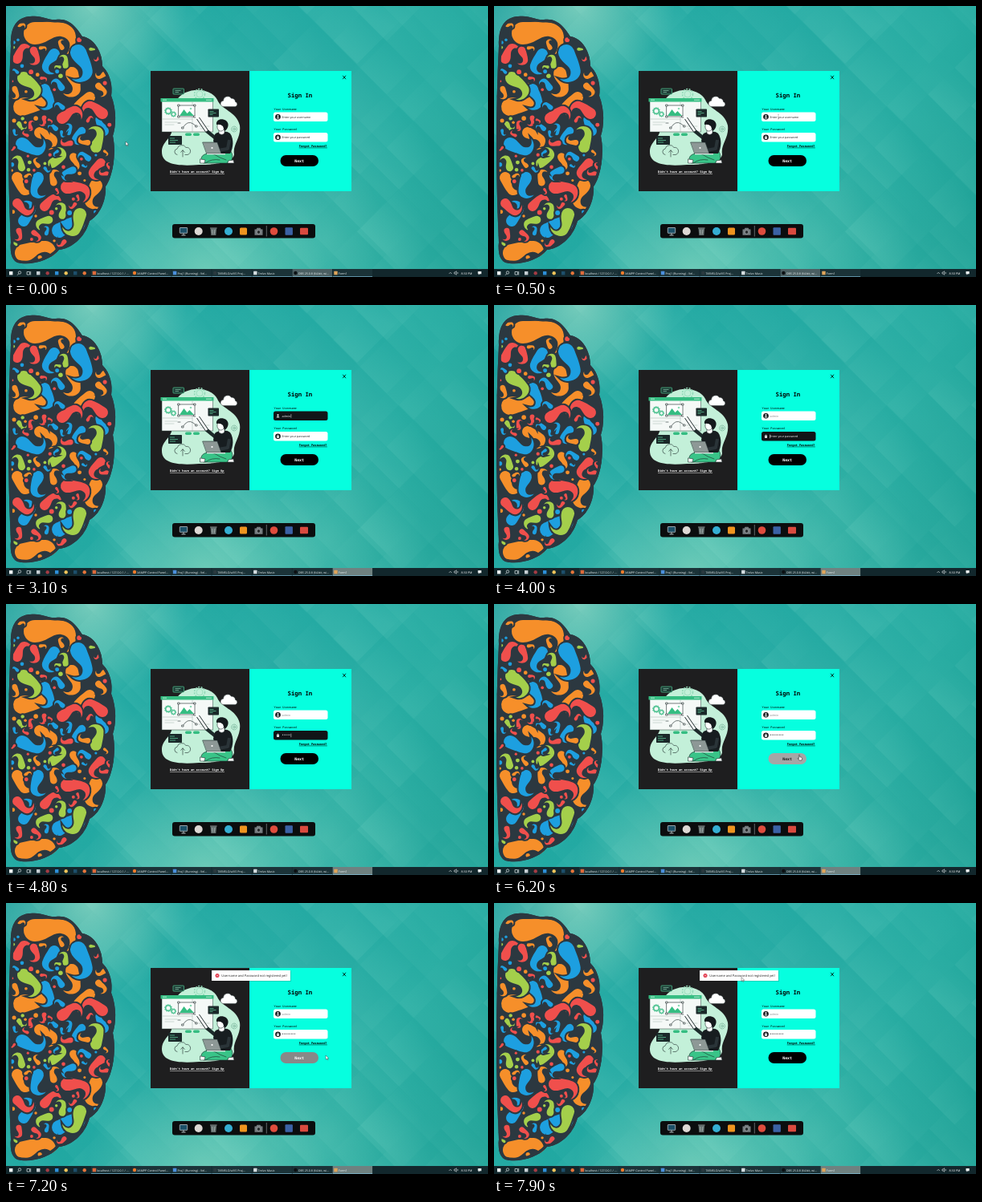
Write an HTML page with a canvas that moves like this. It is 600 px wide and 338 px high and loops after 8000 ms.

```html
<!DOCTYPE html>
<html lang="en">
<head>
<meta charset="utf-8">
<title>Sign In</title>
<style>
html, body { margin: 0; width: 100%; height: 100%; overflow: hidden; background: #2ba79c; }
#wall, #ui { position: absolute; left: 0; top: 0; width: 600px; height: 338px; }
text { text-rendering: geometricPrecision; font-family: "Open Sans", "Noto Sans", sans-serif; font-size: 3.6px; white-space: pre; }
.mono { font-family: "Noto Sans Mono", "DejaVu Sans Mono", monospace; font-weight: 600; font-size: 3.64px; }
.label { font-weight: 400; }
.dots { font-size: 5px; letter-spacing: .25px; }
.line { fill: none; stroke: #1d2b2b; stroke-width: .6; stroke-linejoin: round; stroke-linecap: round; }
.white { fill: #fff; }
</style>
</head>
<body>
<canvas id="wall" width="600" height="338"></canvas>
<svg id="ui" viewBox="0 0 600 338">
  <rect x="180" y="81" width="123" height="150" fill="#1e1e1f"/>
  <rect x="303" y="81" width="127" height="150" fill="#06ffdf"/>

  <g id="art">
    <path fill="#c3f0d9" d="M212 118C222 101 254 100 263 117C268 130 287 131 291 149C293 165 282 172 284 185C283 195 262 198 240 198C214 200 194 198 194 182C194 168 208 166 207 150Z"/>
    <circle cx="241" cy="110" r="4" fill="none" stroke="#8fd9b6" stroke-width=".7"/>
    <circle cx="241" cy="110" r="6.500" fill="none" stroke="#8fd9b6" stroke-width="1.500" stroke-dasharray="2 1.500"/>
    <rect x="208" y="103" width="13.500" height="7" rx=".8" fill="#1d3a34" stroke="#52c894" stroke-width=".7"/>
    <path d="M210.500 105.500h7M210.500 107.500h4.500" stroke="#9be3c1" stroke-width=".6"/>
    <rect x="194" y="116" width="63.500" height="41" fill="#f5f9f7" stroke="#28403a" stroke-width=".5"/>
    <rect x="192.500" y="115" width="66" height="4.500" rx=".6" fill="#35bd82"/>
    <path d="M195 117.200h5M249 117.200h7" stroke="#d7f7e6" stroke-width=".8"/>
    <path class="line" d="M232 120v37M195 141h37M198 145h15M198 148h11M240 150h13M242 153h9" style="stroke:#9db3aa;stroke-width:.5"/>
    <g fill="none" stroke="#4cc290">
      <circle cx="202" cy="131" r="3.300" stroke-width="1.600"/>
      <circle cx="202" cy="131" r="4.500" stroke-width="1" stroke-dasharray="1.400 1.400"/>
      <circle cx="208.500" cy="135" r="2.300" stroke-width="1.300"/>
      <circle cx="208.500" cy="135" r="3.300" stroke-width=".9" stroke-dasharray="1.100 1.100"/>
    </g>
    <rect x="215" y="124" width="20" height="14" class="line white"/>
    <path fill="#35bd82" d="M216 137l5.500-8 4 5 3-3 5.500 6Z"/>
    <circle cx="230" cy="128" r="1.300" fill="#8fdcb8"/>
    <path class="line" d="M214 146h3M220 152q6-10 13-5l4 3"/>
    <path class="line white" d="M214 123h2v2h-2zM234 123h2v2h-2zM214 137h2v2h-2zM234 137h2v2h-2zM219 151h2v2h-2zM236 149h2v2h-2z"/>
    <rect x="223" y="158.500" width="8" height="3.400" rx="1.700" fill="#35bd82"/>
    <rect x="233" y="158.500" width="8" height="3.400" rx="1.700" fill="#35bd82"/>
    <rect x="251.500" y="128.500" width="13.500" height="10" rx=".7" fill="#1a2929"/>
    <path d="M253.500 131.500h5M253.500 133.500h8M253.500 135.500h4" stroke="#61d3a0" stroke-width=".7"/>
    <rect x="202" y="162" width="17" height="11" rx=".7" fill="#1a2929"/>
    <path d="M204 165h6M204 167.500h10M204 170h7" stroke="#61d3a0" stroke-width=".7"/>
    <path class="line white" style="stroke-width:.4" d="M270 125.500a3.700 3.700 0 0 1 .5-7.300 5.500 5.500 0 0 1 10-3 4.500 4.500 0 0 1 5 4.300 3.100 3.100 0 0 1 0 6Z"/>
    <path class="line" d="M213 185.500a3.700 3.700 0 0 1 0-7.300 6 6 0 0 1 11-1.700 4.400 4.400 0 0 1 2 9h-3M220 188v-8m-2.300 2.300l2.300-2.500 2.300 2.500"/>
    <g class="line" style="stroke:#5a9c82">
      <circle cx="284" cy="153.500" r="1.400"/>
      <circle cx="284" cy="153.500" r="3.400" stroke-dasharray="1.600 1"/>
    </g>
    <path d="M261 165L250 156 239 140" fill="none" stroke="#1d2b2b" stroke-width="4.400" stroke-linejoin="round"/>
    <path d="M250 156L238 138.500l-2-2" fill="none" stroke="#fff" stroke-width="2.800" stroke-linejoin="round"/>
    <path fill="#39c488" class="line" style="fill:#39c488" d="M243 190C244 184 252 183 259 185L278 179C284 185 283 194 276 196H246Z"/>
    <path class="line" d="M259 185q8 5 15 7M248 196q8-6 18-4"/>
    <path fill="#171d20" d="M260 160C264 156 275 155 279 159C284 166 283 177 279 184L263 184 258 168Z"/>
    <path class="line white" d="M265 154v5q4 3 7-.5v-5Z"/>
    <ellipse cx="267.500" cy="150.500" rx="4.600" ry="5.600" class="line white"/>
    <path fill="#14191c" d="M262 148C261 141 269 139.500 274 143C279 147 276 154 272 156L270 150Q267 147 262 148Z"/>
    <path d="M278 167L276 178 264 180" fill="none" stroke="#2a3438" stroke-width="4" stroke-linejoin="round"/>
    <path class="line" style="fill:#8d9896" d="M245 170H263L268 184H250Z"/>
    <circle cx="256.500" cy="177" r="1.100" fill="#fff"/>
    <path fill="#dfe5e3" d="M250 184h23v1.300h-23z"/>
    <path class="line white" d="M242 191l6 1-1 4h-5zM277 193l6-1 1 4h-8z"/>
  </g>

  <text class="mono" x="204" y="208.300" fill="#fff">Didn't have an account? Sign Up</text>
  <path d="M204 209.400h68" stroke="#fff" stroke-width=".5"/>
  <text class="mono" x="350.500" y="113.700" style="font-size:7.3px">Sign In</text>
  <path d="M419.200 86.800l3.800 4.400m0-4.400l-3.800 4.400" stroke="#032" stroke-width="1"/>
  <g id="fields"></g>
  <text class="mono" x="364.700" y="175.600">Forgot Password?</text>
  <path d="M364.700 176.900h35.200" stroke="#000" stroke-width=".5"/>
  <rect id="btn" x="341.500" y="186" width="47.500" height="14" rx="7"/>
  <text id="next" class="mono" x="359.300" y="194.900" style="font-size:4.85px">Next</text>

  <g id="dock">
    <rect x="207" y="272" width="178" height="17.500" rx="3" fill="#0b0d0e"/>
    <rect x="216.300" y="276.500" width="9.400" height="6.800" rx=".6" fill="#1c5068" stroke="#b9c4c8" stroke-width=".8"/>
    <path d="M221 283.500v2m-2.500.4h5" stroke="#b9c4c8" stroke-width="1"/>
    <circle cx="239.700" cy="281" r="5" fill="#ddd8d4"/>
    <path d="M254.500 277.500h7.600l-.8 8.500h-6z" fill="#65706f"/>
    <path d="M254 277h8.600M256.800 279l.4 5.500m2.600-5.500l-.4 5.500" stroke="#a9b3b2" stroke-width=".8"/>
    <circle cx="277" cy="281" r="5" fill="#35aed3"/>
    <rect x="291" y="276.500" width="9" height="9" rx="1.500" fill="#ef941f"/>
    <path d="M309.500 278.500h2l1-1.700h4l1 1.700h2v7.200h-10z" fill="#747b7e"/>
    <circle cx="314.500" cy="282" r="2.300" fill="#272b2d" stroke="#b7bdbf" stroke-width=".6"/>
    <path d="M324.300 274v13.500" stroke="#899193" stroke-width=".7"/>
    <circle cx="333.500" cy="281" r="4.800" fill="#de4c3d"/>
    <rect x="347.500" y="276.300" width="9.400" height="9.400" rx="1" fill="#3b62a5"/>
    <rect x="366" y="276.800" width="10" height="8.400" rx="1" fill="#d94a3f"/>
  </g>
  <g id="bar"></g>

  <g id="toast">
    <rect x="255" y="84.300" width="100" height="13.700" fill="#000" opacity=".16"/>
    <rect x="256" y="84" width="98" height="13" fill="#fff"/>
    <circle cx="263" cy="90.500" r="2.500" fill="#e0374a"/>
    <path d="M262.100 89.600l1.800 1.800m0-1.800l-1.800 1.800" stroke="#fff" stroke-width=".6"/>
    <text x="268.300" y="92" fill="#222" style="font-size:4px">Username and Password not registered yet!</text>
  </g>
  <g id="mouse" stroke-linejoin="round">
    <path id="arrow" d="M0 0V5.200L1.300 4.100 2.100 5.900 2.900 5.500 2.100 3.800H3.800Z" fill="#fff" stroke="#222" stroke-width=".4"/>
    <path id="beam" d="M-.8-2.800h1.600M0-2.800v5.600M-.8 2.800h1.600" stroke="#999" stroke-width=".5" fill="none"/>
    <path id="hand" d="M-.6 3.500V-1.800Q0-2.700.6-1.800V.8L3 1.300Q3.800 1.600 3.600 3L3 5H0L-2 2.600Q-1.900 1.700-.6 2.800" fill="#fff" stroke="#111" stroke-width=".5"/>
  </g>
</svg>
<script>
const $ = id => document.getElementById(id);
const ctx = $('wall').getContext('2d', { willReadFrequently: true });
let seed = 11;
const rnd = () => (seed = (seed * 16807) % 2147483647) / 2147483647;

function glow(x, y, r, color, a) {
  const g = ctx.createRadialGradient(x, y, 0, x, y, r);
  g.addColorStop(0, `rgba(${color},${a})`);
  g.addColorStop(1, `rgba(${color},0)`);
  ctx.fillStyle = g;
  ctx.fillRect(0, 0, 600, 338);
}

function wallpaper() {
  const g = ctx.createLinearGradient(0, 0, 560, 338);
  ['#1a9c9b', '#1fa7a1', '#24aaa3', '#27aca2', '#20a398'].forEach((c, i) => g.addColorStop(i / 4, c));
  ctx.fillStyle = g;
  ctx.fillRect(0, 0, 600, 338);
  glow(105, 0, 120, '175,230,205', .6);
  glow(250, 335, 150, '165,228,200', .55);
  glow(400, 290, 120, '140,215,190', .2);
  ctx.save();
  ctx.rotate(-Math.PI / 4);
  for (const s of [74, 47]) {
    for (let u = -260; u < 440; u += s) {
      for (let v = -10; v < 680; v += s) {
        const a = rnd() * .1;
        const f = ctx.createLinearGradient(u, v, u + s, v + s * (rnd() - .5));
        f.addColorStop(0, `rgba(190,250,232,${a})`);
        f.addColorStop(1, 'rgba(190,250,232,0)');
        ctx.fillStyle = f;
        ctx.fillRect(u, v, s, s);
      }
    }
  }
  ctx.restore();
}

const INK = '#2c3840';
const shell = new Path2D('M6 50C5 25 14 14 30 13C45 11 52 18 62 17C80 14 90 30 95 38C110 40 120 58 120 75C130 85 133 100 131 112C138 130 137 150 133 162C138 185 132 215 124 225C125 245 115 262 104 268C98 290 80 303 66 304C55 318 30 324 14 320C6 316 5 305 6 295C2 210 2 130 6 50Z');
const curl = new Path2D('M0-1C1.100-1 1.600-.1 2.400-.3C3.200-.5 3.300-1.200 2.800-1.900C4-1.300 3.900.6 2.700.9C1.700 1.100.9 1 0 1A1 1 0 0 1 0-1Z');
const dot = new Path2D('M1 0A1 1 0 1 1-1 0A1 1 0 1 1 1 0Z');

function stamp(shape, x, y, deg, r, flip, color, shift = 0) {
  ctx.save();
  ctx.translate(x, y);
  ctx.rotate(deg * Math.PI / 180);
  ctx.scale(r, r * flip);
  ctx.translate(-shift, 0);
  ctx.lineWidth = 4 / r;
  ctx.strokeStyle = INK;
  ctx.stroke(shape);
  ctx.fillStyle = color;
  ctx.fill(shape);
  ctx.restore();
}

// head x, y, tail angle and head radius of the large swirls
const swirls = {
  '#f68f2a': [[36, 34, 0, 14], [20, 126, -20, 11], [82, 84, 80, 8], [104, 114, 140, 7], [42, 158, 30, 7], [112, 224, 110, 8], [22, 308, -10, 11], [14, 214, 60, 7]],
  '#1d9fe0': [[90, 58, 70, 10], [60, 60, 120, 7], [48, 104, 70, 7], [20, 172, 20, 8], [122, 156, -110, 6], [40, 214, 100, 7], [66, 280, -25, 9], [22, 268, -60, 7]],
  '#f04f4c': [[14, 66, -60, 6], [120, 134, 210, 7], [70, 140, -30, 7], [118, 196, 130, 6], [76, 226, 10, 8], [14, 246, 40, 6], [48, 250, -40, 6]],
  '#a4cf4b': [[22, 90, 45, 8], [112, 176, -80, 7], [92, 260, 110, 8], [58, 196, -40, 6]]
};

function brain() {
  ctx.save();
  ctx.fillStyle = INK;
  ctx.fill(shell);
  ctx.clip(shell);
  const colors = Object.keys(swirls);
  for (const c of colors)
    swirls[c].forEach(([x, y, a, r], i) => stamp(curl, x, y, a, r, i % 2 ? 1 : -1, c));
  const dark = (x, y) => {
    const p = ctx.getImageData(x, y, 1, 1).data;
    return ctx.isPointInPath(shell, x, y) && p[0] < 60 && p[1] < 75;
  };
  // small curls and dots in the gaps
  for (let i = 0; i < 2400; i++) {
    const r = 10 - i / 280, x = 5 + rnd() * 128, y = 16 + rnd() * 300, a = rnd() * 360;
    let free = dark(x, y);
    for (let k = 0; k < 8 && free; k++)
      free = dark(x + Math.cos(k * .785) * (r + .8), y + Math.sin(k * .785) * (r + .8));
    if (!free) continue;
    if (r > 3) stamp(curl, x, y, a, r / 2, i % 2 ? 1 : -1, colors[i % 4], 1.3);
    else stamp(dot, x, y, 0, r, 1, colors[i % 4]);
  }
  ctx.lineWidth = 7;
  ctx.strokeStyle = INK;
  ctx.stroke(shell);
  ctx.restore();
}

function taskbar() {
  const tasks = [
    ['localhost / 127.0.0.1 / ...', '#dd6a3a'], ['XAMPP Control Panel...', '#ee7b2b'],
    ['Proj1 (Running) - Vel...', '#4b8fdc'], ['TARVELO/a/VS Proj...', '#2b3a40'],
    ['Trelvo Music', '#d5dde0'], ['OBS 25.0.8 (64-bit, wi...', '#0c1013'], ['Form1', '#dfa45a']
  ];
  const pins = ['#c5ced3', '#a33c44', '#2d8fd8', '#eec35a', '#1d4f6b', '#e5753a'];
  let s = `<rect y="328" width="600" height="10" fill="#12272c"/>
    <rect x="4" y="331" width="4.400" height="4.400" fill="#eef4f5"/>
    <g fill="none" stroke="#dfe8ea" stroke-width=".7"><circle cx="17" cy="332.500" r="1.700"/><path d="M15.800 333.800l-1.700 1.900M26 331.500h3.500v3.500h-3.500zM30.700 331v4.500"/></g>`;
  pins.forEach((c, i) => s += `<rect x="${38 + i * 11.5}" y="331" width="4.400" height="4.400" rx="${i % 2 * 2.2}" fill="${c}"/>`);
  tasks.forEach(([name, c], i) => {
    const x = 106 + i * 50.1;
    s += `<rect id="task${i}" x="${x}" y="328" width="49.500" height="10" fill="#1b3338"/>
      <rect x="${x}" y="337.300" width="49.500" height=".7" fill="#7cb9d4"/>
      <rect x="${x + 1.7}" y="330.800" width="4.400" height="4.400" rx="${i % 2 ? 2.2 : .5}" fill="${c}"/>
      <text x="${x + 7.2}" y="334.500" fill="#f4f8f8">${name}</text>`;
  });
  $('bar').innerHTML = s + `<path d="M551.500 334l1.700-1.700 1.700 1.700M558 332h1.200l1.500-1.200v4.400l-1.500-1.200h-1.200zM562 332q1 1 0 2" fill="none" stroke="#e8eff0" stroke-width=".6"/>
    <text x="566.500" y="334.500" fill="#fff" style="font-size:3.7px">8:30 PM</text>
    <path d="M587.500 331h4.200v3.200h-2l-1.200 1.300v-1.300h-1z" fill="#f1f6f6"/>`;
}

function addField(id, top, label, icon) {
  const y = top + 5.8;
  $('fields').innerHTML += `<text class="mono label" x="333.500" y="${top - 3}">${label}</text>
    <rect id="${id}Box" x="333" y="${top}" width="67.500" height="11.500" rx="2.500"/>
    <circle cx="338.500" cy="${y}" r="3.300" fill="#0f1316"/>
    <path transform="translate(338.500 ${y})" d="${icon}" fill="#fff"/>
    <text id="${id}Text" x="343.600" y="${y + 1.2}"></text>
    <rect id="${id}Caret" y="${y - 2.2}" width=".5" height="4.600" fill="#fff"/>`;
}

function paintField(id, focus, typed, hint, secret, caret) {
  const text = $(id + 'Text'), n = typed.length;
  $(id + 'Box').setAttribute('fill', focus ? '#111518' : '#fff');
  text.setAttribute('class', secret && n ? 'dots' : '');
  text.setAttribute('fill', focus ? '#fff' : n && !secret ? '#858a8c' : '#1c2022');
  text.textContent = typed || hint;
  const bar = $(id + 'Caret');
  bar.setAttribute('x', n ? 344 + text.getComputedTextLength() : 343);
  bar.setAttribute('opacity', focus && caret ? 1 : 0);
}

const count = (times, t) => times.filter(k => t >= k).length;
const nameKeys = [1700, 1800, 2000, 2100, 2200];
const passKeys = [4200, 4300, 4500, 4600, 4800, 5000, 5100, 5200];
const blinks = [600, 1500, 1700, 2600, 3100, 3600, 3900, 5700, 6200];
// time, x, y of the pointer
const path = [[0, 149, 169], [100, 149, 169], [500, 354, 138], [5400, 354, 138], [5500, 357, 149], [5900, 380, 190],
  [7000, 380, 190], [7200, 398, 190], [7300, 407, 182], [7500, 371, 178], [7900, 308, 92.500], [8000, 308, 92.500]];
// start time and kind of pointer
const kinds = [[0, 'arrow'], [500, 'beam'], [1000, ''], [5500, 'arrow'], [5800, 'hand'], [7200, 'arrow']];
// time, fill, label colour of the button
const button = [[0, '#000', '#fff'], [5800, '#777', '#111'], [5900, '#ccc', '#111'], [6000, '#fff', '#000'], [6200, '#a6a6a6', '#222'],
  [6300, '#d4d4d4', '#111'], [6400, '#fff', '#000'], [7200, '#888', '#fff'], [7300, '#000', '#fff']];
const at = (table, t) => table[count(table.map(row => row[0]), t) - 1];

function pointer(t) {
  const i = Math.max(1, path.findIndex(p => p[0] > t));
  const [t0, x0, y0] = path[i - 1], [t1, x1, y1] = path[i];
  const k = (t - t0) / (t1 - t0), e = k * k * (3 - 2 * k);
  $('mouse').setAttribute('transform', `translate(${x0 + (x1 - x0) * e} ${y0 + (y1 - y0) * e})`);
  const kind = at(kinds, t)[1];
  for (const id of ['arrow', 'beam', 'hand']) $(id).style.display = id === kind ? '' : 'none';
}

function render(time) {
  const t = Math.floor(time / 100) * 100;
  const caret = count(blinks, t) % 2 === 1;
  paintField('user', t >= 600 && t < 3900, 'admin'.slice(0, count(nameKeys, t)), 'Enter your username', false, caret);
  paintField('pass', t >= 3900 && t < 6200, '•'.repeat(count(passKeys, t)), 'Enter your password', true, caret);
  const [, fill, ink] = at(button, t);
  $('btn').setAttribute('fill', fill);
  $('next').setAttribute('fill', ink);
  $('toast').setAttribute('opacity', Math.min(1, Math.max(0, (t - 6600) / 550)));
  $('task5').setAttribute('fill', t < 1000 ? '#4b5f62' : '#1b3338');
  $('task6').setAttribute('fill', t < 1000 ? '#1b3338' : '#6f8180');
  pointer(t);
}

wallpaper();
brain();
taskbar();
addField('user', 132.5, 'Your Username', 'M0-2.100a1.100 1.100 0 0 1 0 2.300a1.100 1.100 0 0 1 0-2.300ZM-2 2Q-1.800.6 0 .6T2 2Z');
addField('pass', 158, 'Your Password', 'M-1.500-.3h.4v-.6a1.100 1.100 0 0 1 2.200 0v.6h.4v2.300h-3zM-.5-.3h1v-.6a.5.5 0 0 0-1 0z');

const start = performance.now();
function frame() {
  render((performance.now() - start) % 8000);
  requestAnimationFrame(frame);
}
frame();
</script>
</body>
</html>
```
